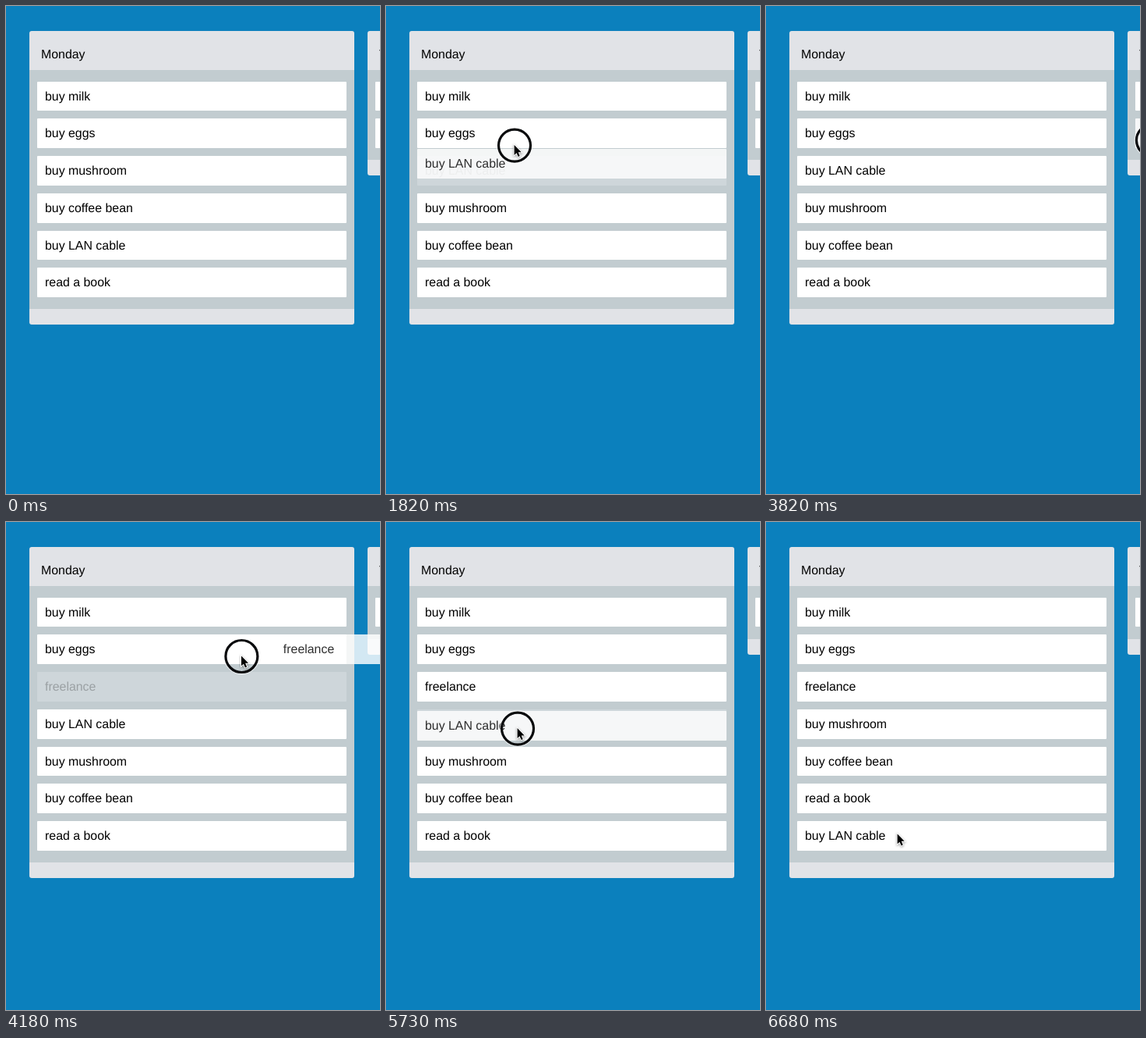
Animation of 480 by 625 pixels, one loop 7600 ms. Source, as an HTML page with a canvas:

```html
<!DOCTYPE html>
<html lang="en">
<head>
<meta charset="utf-8">
<title>Drag and drop board</title>
<style>
  html, body { margin: 0; width: 100%; height: 100%; overflow: hidden; background: #0b80bd; }
  canvas { display: block; width: 480px; height: 625px; }
</style>
</head>
<body>
<canvas id="stage"></canvas>
<script>
const W = 480, H = 625, LOOP = 7600;
const LAG = 55; // the dragged card trails the pointer
const LEFT = 30, RIGHT = 464, PANEL_W = 417, HEAD = 82;
const CARD_W = 397, CARD_H = 37.8, PITCH = 47.75, FIRST = 96.6;
const BLUE = '#0b80bd', PANEL = '#e1e3e7', BODY = '#c2ccd0';

const canvas = document.getElementById('stage');
const ctx = canvas.getContext('2d');
const dpr = window.devicePixelRatio || 1;
canvas.width = W * dpr;
canvas.height = H * dpr;
ctx.scale(dpr, dpr);

// Pointer moves on each axis: start time, end time, goal
const sweepX = [[50, 1090, 165], [2550, 3116, 496], [3795, 4495, 193], [5100, 5450, 169]];
const sweepY = [
  [900, 1270, 301], [1520, 1900, 174], [1900, 2090, 188], [2550, 2910, 164],
  [2910, 3270, 172], [4180, 4700, 213], [5100, 5450, 254], [5598, 6118, 412], [6320, 6500, 400]
];

const drags = [
  { from: 1500, to: 2550, name: 'buy LAN cable', x: LEFT, home: 4, goal: 2 },
  { from: 3770, to: 4910, name: 'freelance', x: RIGHT, home: 1, goal: 2 },
  { from: 5590, to: 6680, name: 'buy LAN cable', x: LEFT, home: 3, goal: 6 }
];

const clamp = (v, a, b) => Math.min(Math.max(v, a), b);
const ease = u => u < 0.5 ? 4 * u ** 3 : 1 - 4 * (1 - u) ** 3;
const slotY = i => FIRST + PITCH * i;

const follow = (start, sweeps, t) => sweeps.reduce(
  (v, [from, to, goal]) => v + (goal - v) * ease(clamp((t - from) / (to - from), 0, 1)), start);

const pointer = t => ({ x: follow(500, sweepX, t), y: follow(275, sweepY, t) });

// A neighbour gives way once the pointer has passed its middle
function slotAt(drag, t) {
  if (t >= drag.to) return drag.goal;
  const { home, goal } = drag;
  const row = (pointer(t - LAG).y - FIRST - CARD_H / 2 + 3) / PITCH;
  if (drag.x === RIGHT) return goal;
  return goal < home ? clamp(Math.ceil(row), goal, home) : clamp(Math.floor(row), home, goal);
}

function lists(t) {
  const monday = ['buy milk', 'buy eggs', 'buy mushroom', 'buy coffee bean', 'buy LAN cable', 'read a book'];
  const tuesday = ['buy tea', 'freelance'];
  for (const drag of drags) {
    const source = drag.x === LEFT ? monday : tuesday;
    const entered = source === monday || pointer(t - LAG).x < LEFT + PANEL_W;
    if (t < drag.from || (t < drag.to && !entered)) break;
    source.splice(source.indexOf(drag.name), 1);
    monday.splice(slotAt(drag, t), 0, drag.name);
  }
  return [monday, tuesday];
}

function box(x, y, w, h, r, fill) {
  ctx.fillStyle = fill;
  ctx.beginPath();
  ctx.roundRect(x, y, w, h, r);
  ctx.fill();
}

function text(str, x, y) {
  ctx.font = '15.9px "Liberation Sans", Arial, sans-serif';
  ctx.textRendering = 'geometricPrecision';
  ctx.fillStyle = '#000';
  ctx.fillText(str, x, y);
}

function card(name, x, y, alpha = 1, ink = alpha) {
  const top = Math.round(y), bottom = Math.round(y + CARD_H);
  ctx.globalAlpha = alpha;
  box(x, top, CARD_W, bottom - top, 1, '#fff');
  ctx.globalAlpha = ink;
  text(name, x + 10, y + 24);
  ctx.globalAlpha = 1;
}

function panel(title, items, x, held) {
  const end = Math.round(slotY(items.length) + 5.2);
  box(x, 32, PANEL_W, end - 12, 3, PANEL);
  ctx.fillStyle = BODY;
  ctx.fillRect(x, HEAD, PANEL_W, end - HEAD);
  text(title, x + 15, 67);
  items.forEach((name, i) => {
    if (name === held) card(name, x + 10, slotY(i), 0.2, 0.25);
    else card(name, x + 10, slotY(i));
  });
}

function circle(p, radius, width, color) {
  ctx.beginPath();
  ctx.arc(p.x, p.y, radius, 0, Math.PI * 2);
  ctx.strokeStyle = color;
  ctx.lineWidth = width;
  ctx.stroke();
}

function arrow(p) {
  const shape = [[0, 0], [0, 13.5], [3.1, 10.7], [5.3, 15.8], [7.5, 14.8], [5.4, 9.8], [9.6, 9.8]];
  ctx.save();
  ctx.translate(p.x - 0.4, p.y - 0.5);
  ctx.scale(0.95, 0.95);
  ctx.beginPath();
  shape.forEach(([x, y]) => ctx.lineTo(x, y));
  ctx.closePath();
  ctx.shadowColor = 'rgba(0,0,0,0.4)';
  ctx.shadowBlur = 3 * dpr;
  ctx.shadowOffsetY = dpr;
  ctx.strokeStyle = '#fff';
  ctx.lineWidth = 2;
  ctx.stroke();
  ctx.shadowColor = 'transparent';
  ctx.fillStyle = '#000';
  ctx.fill();
  ctx.restore();
}

function draw(t) {
  ctx.fillStyle = BLUE;
  ctx.fillRect(0, 0, W, H);
  const drag = drags.find(d => t >= d.from && t < d.to);
  const held = drag && drag.name;
  const [monday, tuesday] = lists(t);
  panel('Monday', monday, LEFT, held);
  panel('Tuesday', tuesday, RIGHT, held);
  const tip = pointer(t);
  if (drag) {
    const start = pointer(drag.from), now = pointer(t - LAG);
    card(held, drag.x + 10 + now.x - start.x, slotY(drag.home) + now.y - start.y, 0.82);
    circle(tip, 22.4, 2, 'rgba(255,255,255,0.5)');
    circle(tip, 20.5, 3.2, '#0a0b0d');
  }
  arrow(tip);
}

const origin = performance.now();
function tick() {
  draw((performance.now() - origin) % LOOP);
  requestAnimationFrame(tick);
}
tick();
</script>
</body>
</html>
```
